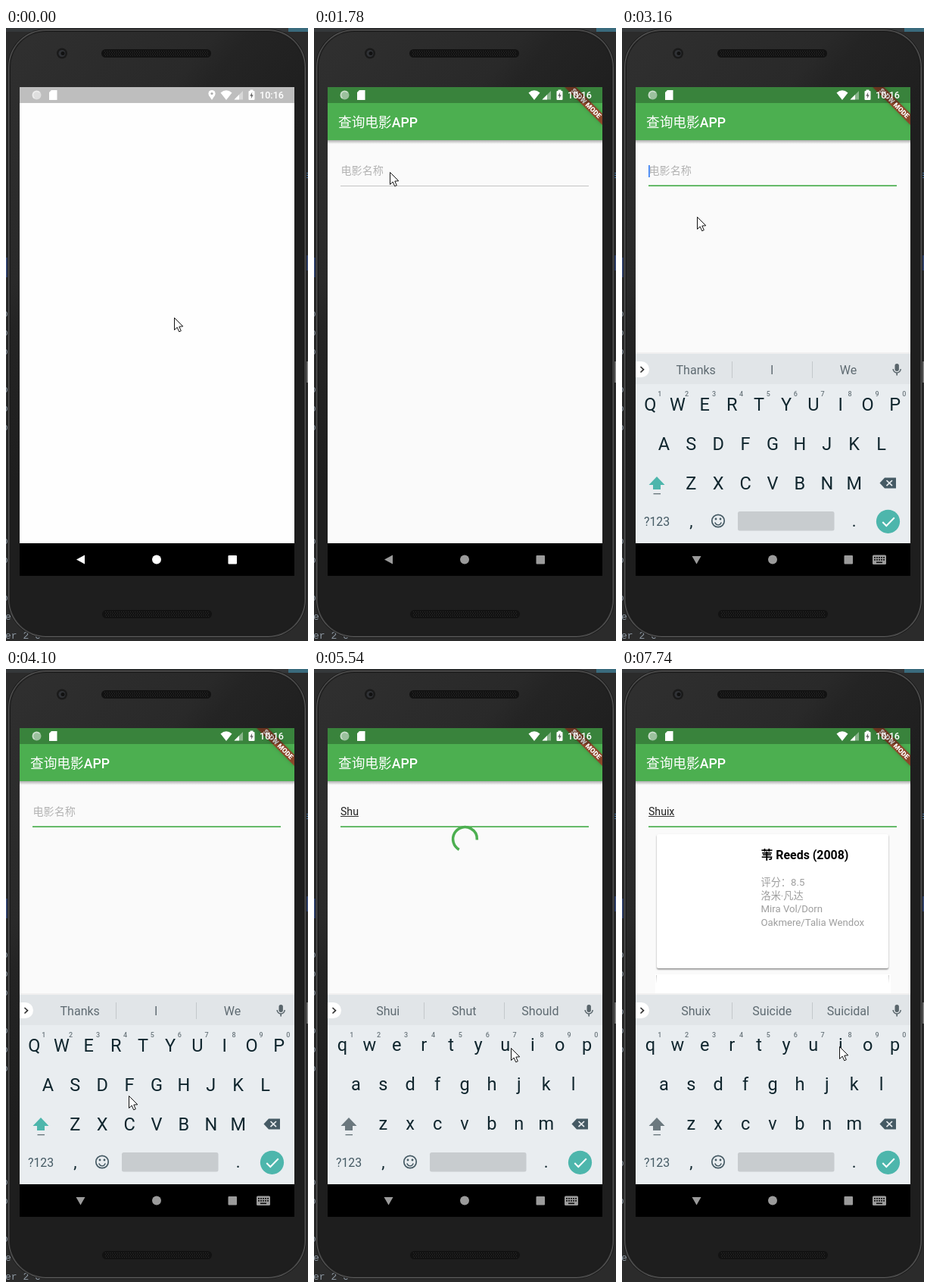
These frames come from a looping animation (399 by 809 pixels, 8000 ms). An HTML page with a canvas:

```html
<!DOCTYPE html>
<html lang="zh-CN">
<head>
<meta charset="utf-8">
<title>Phone search demo</title>
<style>
html, body { margin: 0; width: 399px; height: 809px; overflow: hidden; background: #2b2b2b; }
canvas { display: block; }
</style>
</head>
<body>
<canvas id="stage" width="399" height="809"></canvas>
<script>
const stage = document.getElementById('stage');
const scratch = Object.assign(document.createElement('canvas'), { width: 399, height: 809 });
let ctx = stage.getContext('2d');

const LOOP = 8000;
const SANS = 'Roboto, "Noto Sans CJK SC", "Noto Sans CJK", sans-serif';
const MONO = '"Liberation Mono", monospace';
const GREEN = '#4caf50', TEAL = '#4db6ac', SLATE = '#455a64', INK = '#10262e';
const SCREEN = { x: 18, y: 78, w: 363, h: 645, bar: 148, nav: 680 };

// Pointer strokes: from, to, end x, end y
const STROKES = [
  [280, 550, 164, 272], [1120, 1780, 100, 189], [3030, 3670, 93, 553], [3700, 4080, 162, 563],
  [4100, 4460, 231, 560], [4480, 4760, 251, 534], [4980, 5250, 253, 501], [5380, 5660, 280, 497],
  [6200, 6530, 194, 574], [6540, 6900, 124, 605], [7200, 7620, 287, 498]
];

const TYPED = [
  [0, '', 'Thanks I We'], [4610, 'S', 'S So She'], [4730, 'Sh', 'Sh She Should'],
  [5390, 'Shu', 'Shui Shut Should'], [6840, 'Shui', 'Shui Suicide Suicidal'],
  [7350, 'Shuix', 'Shuix Suicide Suicidal']
];

const clamp = (v, lo, hi) => Math.min(hi, Math.max(lo, v));
const stepped = t => Math.max(0, 280 + Math.floor((t - 280) / 136) * 136);
const easeOut = (t, start) => 1 - (1 - clamp((t - start) / 400, 0, 1)) ** 2;

function pointerAt(t) {
  let x = 222, y = 382;
  for (const [from, to, endX, endY] of STROKES) {
    const p = clamp((t - from) / (to - from), 0, 1);
    x += (endX - x) * p;
    y += (endY - y) * p;
  }
  return [Math.round(x), Math.round(y)];
}

function rect(x, y, w, h, color) {
  ctx.fillStyle = color;
  ctx.fillRect(x, y, w, h);
}
function round(x, y, w, h, r, color) {
  ctx.beginPath();
  ctx.roundRect(x, y, w, h, r);
  ctx.fillStyle = color;
  ctx.fill();
}
function disc(x, y, r, color) {
  ctx.beginPath();
  ctx.arc(x, y, r, 0, Math.PI * 2);
  ctx.fillStyle = color;
  ctx.fill();
}
function trace(points) {
  ctx.beginPath();
  points.forEach(([x, y]) => ctx.lineTo(x, y));
}
function poly(points, color) {
  trace(points);
  ctx.closePath();
  ctx.fillStyle = color;
  ctx.fill();
}
function line(points, color, width) {
  trace(points);
  ctx.strokeStyle = color;
  ctx.lineWidth = width;
  ctx.stroke();
}
function arc(x, y, r, from, to, color, width) {
  ctx.beginPath();
  ctx.arc(x, y, r, from, to);
  ctx.strokeStyle = color;
  ctx.lineWidth = width;
  ctx.stroke();
}
function text(str, x, y, size, color, { weight = 400, align = 'left', family = SANS } = {}) {
  ctx.font = `${weight} ${size}px ${family}`;
  ctx.textAlign = align;
  ctx.fillStyle = color;
  ctx.fillText(str, x, y);
  return ctx.measureText(str).width;
}
function gradient(x0, y0, x1, y1, ...stops) {
  const g = ctx.createLinearGradient(x0, y0, x1, y1);
  stops.forEach(([p, c]) => g.addColorStop(p, c));
  return g;
}
function clip(x, y, w, h) {
  ctx.beginPath();
  ctx.rect(x, y, w, h);
  ctx.clip();
}

// Fades a whole drawing as one picture.
function group(alpha, draw) {
  if (alpha <= 0) return;
  const page = ctx;
  ctx = scratch.getContext('2d');
  ctx.clearRect(0, 0, 399, 809);
  ctx.save();
  draw();
  ctx.restore();
  ctx = page;
  ctx.save();
  ctx.globalAlpha = alpha;
  ctx.drawImage(scratch, 0, 0);
  ctx.restore();
}

function drawDesktop(t) {
  const style = { family: MONO }, color = '#8f9aa5';
  rect(0, 0, 399, 809, '#2b2b2b');
  rect(0, 0, 399, 5, '#35383a');
  rect(373, 0, 26, 5, '#3a6b7d');
  rect(0, 303, 4, 26, '#33436b');
  rect(396, 300, 3, 20, '#33436b');
  const rows = t < 6330 ? 'ooo ooo     oo o' : 'oo ooo     o o';
  [...rows].forEach((c, i) => text(c, -5, 381 + i * 25, 13, color, style));
  text('e', -1, 781, 13, color, style);
  if (t < 6330) text('er 2 6', -1, 806, 13, color, style);
  text('s', 394, 198, 13, '#4f83b5', style);
}

function drawSpeaker(x, y) {
  round(x, y, 145, 11, 5.5, '#121212');
  for (let row = 0; row < 4; row++)
    for (let i = 0; i < 46; i++)
      rect(x + 4 + i * 3 + row % 2, y + 2 + row * 2, 1, 1, '#2c2c2c');
}

function drawPhone() {
  rect(396, 440, 3, 28, '#777');
  const shells = ['#1c1c1c', '#5a5a5a', '#333', '#1a1a1a',
    gradient(0, 0, 300, 243, [0, '#303030'], [.57, '#292929'], [.66, '#242424'], [1, '#1e1e1e'])];
  shells.forEach((color, i) => round(2 + i, 1 + i, 395 - 2 * i, 804 - 2 * i, 51 - i, color));
  drawSpeaker(126, 28);
  drawSpeaker(127, 768);
  disc(74, 33.5, 7, '#1a1a1a');
  disc(74, 33.5, 4.5, '#303236');
  disc(75, 33.5, 2.5, '#111');
}

function drawBanner() {
  ctx.save();
  ctx.translate(381, 78);
  ctx.rotate(Math.PI / 4);
  ctx.shadowColor = 'rgba(0,0,0,.3)';
  ctx.shadowBlur = 5;
  rect(-35.3, 24.7, 70.6, 10.6, 'rgba(183,28,28,.63)');
  ctx.shadowColor = 'transparent';
  text('SLOW MODE', 0, 33.2, 9, '#fff', { weight: 900, align: 'center' });
  ctx.restore();
}

function drawResults() {
  ctx.save();
  ctx.shadowColor = 'rgba(0,0,0,.45)';
  ctx.shadowBlur = 2;
  ctx.shadowOffsetY = 1.5;
  round(46, 218, 306, 177, 2, '#fff');
  ctx.restore();
  rect(44, 403, 311, 25, '#fff');
  for (const x of [45, 352])
    rect(x, 404, 1, 11, gradient(0, 404, 0, 415, [0, '#ccc'], [1, '#fff']));
  text('苇 Reeds (2008)', 183.5, 251, 15.9, '#000', { weight: 700 });
  ['评分：8.5', '洛米·凡达', 'Mira Vol/Dorn', 'Oakmere/Talia Wendox']
    .forEach((s, i) => text(s, 183.5, 286 + i * 17.5, 13.2, '#9e9e9e'));
}

function drawSpinner(t) {
  // The picture hangs for a moment while the request is sent.
  const elapsed = stepped(t) - clamp(t - 5660, 0, 670) - 4768;
  const middle = .855 + .00494 * elapsed;
  const half = 1.22 + 1.135 * Math.sin(.249 + .00288 * elapsed);
  arc(199.5, 224.5, 15.9, middle - half, middle + half, GREEN, 3.5);
}

function drawField(t, typed) {
  let width = 0;
  if (typed) {
    width = text(typed, 35, 193, 14.1, '#212121');
    rect(35, 194, width, 1, '#333');
  } else {
    text('电影名称', 35.5, 193, 14.1, '#b3b3b3');
  }
  const focused = t >= 2740;
  rect(35, focused ? 207.3 : 208, 328, focused ? 1.7 : 1, focused ? GREEN : '#c4c4c4');
  if (t >= 2890 && (t - 2890) % 2000 < 500) rect(35 + width, 181, 1.8, 16, '#4285f4');
}

function drawApp(t, typed) {
  const { x, y, w, bar, nav } = SCREEN;
  const fade = easeOut(stepped(t), 840);
  group(fade, () => {
    clip(x, y, w, SCREEN.h);
    rect(x, y, w, (fade < 1 ? 290 : nav) - y, '#fafafa');
    rect(x, bar, w, 5, gradient(0, bar, 0, bar + 5, [0, 'rgba(0,0,0,.3)'], [1, 'rgba(0,0,0,0)']));
    rect(x, y, w, bar - y, GREEN);
    text('查询电影APP', 32, 130.5, 17.66, '#fff', { weight: 500 });
    drawField(t, typed);
    if (t >= 4730 && t < 7350) drawSpinner(t);
    if (t >= 7350) drawResults();
    drawBanner();
  });
}

function drawStatusBar(t) {
  rect(18, 78, 363, 21, 'rgba(0,0,0,.255)');
  disc(40.5, 88.5, 6, 'rgba(255,255,255,.5)');
  arc(40.5, 88.5, 5, 2.2, 5.6, 'rgba(255,255,255,.5)', 1.5);
  poly([[60, 82], [67.5, 82], [67.5, 95], [57, 95], [57, 85]], '#fff');
  if (t < 1540) {
    poly([[267.8, 88.5], [276.2, 88.5], [272, 95]], '#fff');
    disc(272, 86.5, 4.6, '#fff');
    disc(272, 86.5, 1.6, '#aaa');
  }
  ctx.beginPath();
  ctx.moveTo(291, 95);
  ctx.lineTo(283.5, 85.5);
  ctx.quadraticCurveTo(291, 79, 298.5, 85.5);
  ctx.fillStyle = '#fff';
  ctx.fill();
  poly([[313, 83], [313, 94.5], [301.5, 94.5]], 'rgba(255,255,255,.4)');
  poly([[308, 88], [308, 94.5], [301.5, 94.5]], '#fff');
  round(320.5, 83, 8, 12, 1, '#fff');
  rect(322.5, 81.5, 4, 2, '#fff');
  poly([[325.3, 84.5], [322.3, 89.7], [324.3, 89.7], [323.7, 93.5], [326.7, 88.3], [324.8, 88.3]], '#666');
  text('10:16', 335, 93, 12.6, '#fff', { weight: 500 });
}

function drawNavBar(t) {
  const keyboardUp = t >= 2740;
  const color = t < 700 ? '#fff' : '#9b9b9b';
  rect(SCREEN.x, SCREEN.nav, SCREEN.w, 43, '#000');
  if (keyboardUp) poly([[92.5, 697], [104.5, 697], [98.5, 707.5]], color);
  else poly([[93, 701.5], [104, 695.5], [104, 707.5]], color);
  disc(199, 701.5, 6, color);
  round(293.5, 696, 11.5, 11.5, 1, color);
  if (!keyboardUp) return;
  round(331, 695.5, 18, 12.5, 1.5, color);
  for (let i = 0; i < 10; i++)
    rect(333 + i % 5 * 3, i < 5 ? 698 : 701, 2, 1.6, '#111');
  rect(336, 704.5, 8, 1.6, '#111');
}

function drawSuggestions(words) {
  rect(18, 428, 363, 2, 'rgba(0,0,0,.04)');
  rect(18, 430, 363, 40, '#e1e5e8');
  round(7, 440, 29, 21, 10.5, '#fff');
  line([[24.5, 447], [28.5, 450.7], [24.5, 454.5]], '#333', 1.7);
  rect(145, 440, 1, 22, '#c3c8cb');
  rect(251, 440, 1, 22, '#c3c8cb');
  words.split(' ').forEach((w, i) =>
    text(w, 97.7 + i * 100.6, 457, 16, '#5f6b72', { align: 'center' }));
  round(360.5, 443, 5.4, 10, 2.7, '#59656b');
  arc(363.2, 450, 5, 0, Math.PI, '#59656b', 1.5);
  rect(362.4, 455, 1.6, 3.5, '#59656b');
}

function drawLetters(upper) {
  const rows = upper ? ['QWERTYUIOP', 'ASDFGHJKL', 'ZXCVBNM'] : ['qwertyuiop', 'asdfghjkl', 'zxcvbnm'];
  rows.forEach((row, r) => [...row].forEach((c, i) => {
    const x = 199 + (i - (row.length - 1) / 2) * 35.9;
    text(c, x, 504 + upper + r * 52, 23.5, INK, { align: 'center' });
    if (!r) text((i + 1) % 10, x + 12.3, 486, 9, '#6b777d', { weight: 500, align: 'center' });
  }));
}

function drawKeys(upper) {
  const center = { align: 'center' };
  drawLetters(upper);
  poly([[46, 592], [56.5, 603], [51, 603], [51, 609], [41, 609], [41, 603], [35.5, 603]],
    upper ? TEAL : '#6b787e');
  rect(41.5, 614, 9.5, 1.4, '#6b787e');

  poly([[347, 593.5], [362, 593.5], [362, 607.5], [347, 607.5], [340.5, 600.5]], SLATE);
  line([[349.5, 597], [357, 604.2]], '#e9edf0', 1.7);
  line([[357, 597], [349.5, 604.2]], '#e9edf0', 1.7);

  text('?123', 46, 656.5, 15.8, SLATE, center);
  text(',', 91.3, 657.5, 22, INK, center);
  text('.', 306.7, 657.5, 22, INK, center);
  arc(127, 650.5, 8.2, 0, Math.PI * 2, SLATE, 1.7);
  disc(124, 648, 1.4, SLATE);
  disc(130, 648, 1.4, SLATE);
  arc(127, 651.5, 4.2, .2, Math.PI - .2, SLATE, 1.5);
  round(153, 638, 127.5, 25.5, 2.5, '#c8cccf');
  disc(351.5, 651.3, 15.6, TEAL);
  line([[344.3, 652], [349.3, 657], [359.8, 646.3]], '#fff', 2);
}

function drawKeyboard(t, words) {
  const shown = easeOut(stepped(t), 2610);
  group(shown, () => {
    clip(SCREEN.x, SCREEN.y, SCREEN.w, shown < 1 ? SCREEN.h : SCREEN.nav - SCREEN.y);
    ctx.translate(0, Math.round(124 * (1 - shown)));
    rect(18, 470, 363, 253, '#e9edf0');
    drawSuggestions(words);
    drawKeys(t < 4610);
  });
}

function drawPointer(t) {
  const [x, y] = pointerAt(stepped(t));
  ctx.save();
  ctx.translate(x + .5, y + .5);
  poly([[0, 0], [0, 16], [3.7, 12.6], [6.2, 18.3], [8.8, 17.2], [6.3, 11.6], [11.3, 11.3]], '#fff');
  ctx.strokeStyle = '#111';
  ctx.lineWidth = 1;
  ctx.stroke();
  ctx.restore();
}

function render(t) {
  const [, typed, words] = TYPED.filter(entry => entry[0] <= t).pop();
  drawDesktop(t);
  drawPhone();
  ctx.save();
  clip(SCREEN.x, SCREEN.y, SCREEN.w, SCREEN.h);
  rect(SCREEN.x, SCREEN.y, SCREEN.w, SCREEN.h, '#fefefe');
  drawApp(t, typed);
  drawStatusBar(t);
  drawNavBar(t);
  drawKeyboard(t, words);
  ctx.restore();
  drawPointer(t);
}

const start = performance.now();
function loop() {
  render((performance.now() - start) % LOOP);
  requestAnimationFrame(loop);
}
loop();
</script>
</body>
</html>
```
